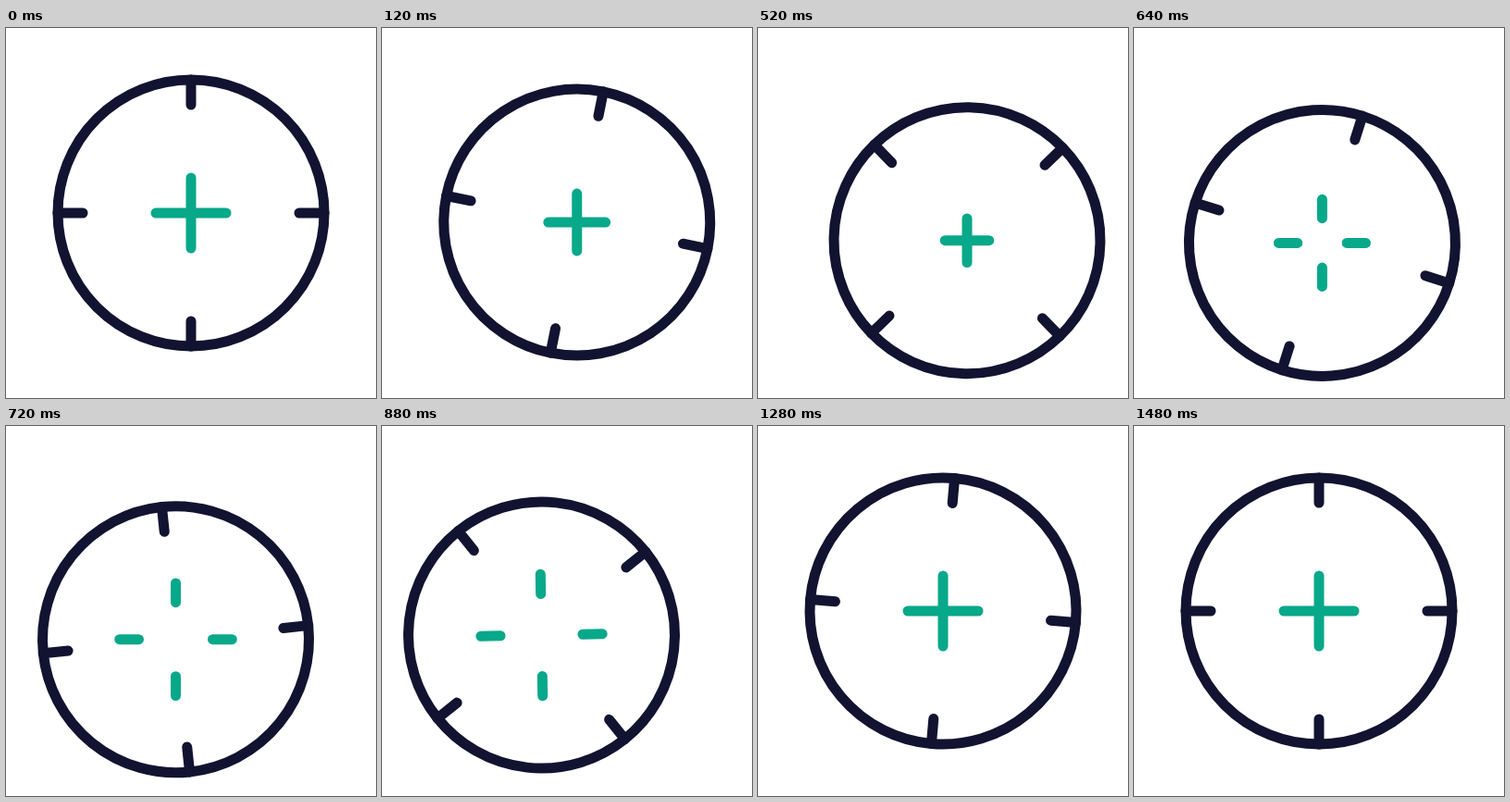
An HTML page that plays this animation: 400x400 px, repeating every 1570 ms.

```html
<!DOCTYPE html>
<html lang="en">
<head>
<meta charset="utf-8">
<title>Target</title>
<style>
html, body { margin: 0; width: 100%; height: 100%; overflow: hidden; background: #fff; }
svg { display: block; width: 100%; height: 100%; fill: none; stroke-width: 11; stroke-linecap: round; }
#ring { stroke: #121331; }
#cross { stroke: #08a88a; }
</style>
</head>
<body>
<svg viewBox="0 0 400 400">
  <g id="target">
    <g id="cross"><path id="arms"/></g>
    <g id="ring">
      <circle r="144"/>
      <path d="M0-144V-117M144 0H117M0 144V117M-144 0H-117"/>
    </g>
  </g>
</svg>
<script>
const LOOP = 1570, STEP = 40, LAST = 1480;

// Smooth track through [time, value] pairs, without overshoot
function track(...keys) {
  const slope = i => (keys[i + 1][1] - keys[i][1]) / (keys[i + 1][0] - keys[i][0]);
  const tangent = keys.map((_, i) => {
    if (i === 0 || i === keys.length - 1) return 0;
    const a = slope(i - 1), b = slope(i);
    return a * b > 0 ? 2 * a * b / (a + b) : 0;
  });
  return t => {
    const i = keys.findIndex(k => k[0] > t) - 1;
    if (i < 0) return keys[keys.length - 1][1];
    const [t0, v0] = keys[i], [t1, v1] = keys[i + 1];
    const d = t1 - t0, u = (t - t0) / d, w = 1 - u;
    return v0 * w * w * (1 + 2 * u) + v1 * u * u * (3 - 2 * u)
      + d * u * w * (tangent[i] * w - tangent[i + 1] * u);
  };
}

const x = track([0, 200], [280, 228], [380, 228.5], [520, 226], [560, 223.3],
  [720, 183.5], [880, 172.5], [1040, 188], [1120, 198.8], [1200, 200]);
const y = track([0, 200], [280, 227], [520, 229.7], [560, 230.6], [640, 232.4],
  [720, 230.7], [880, 226], [1040, 209.8], [1120, 201.5], [1200, 200]);
const spin = track([0, 0], [280, 36.3], [430, 48], [520, 45.9],
  [720, -6], [1040, -63.8], [1280, -85], [1480, -90]);
const turn = track([0, 0], [860, 0], [1040, -45], [1220, -90]);
const inner = track([0, 0], [400, 0], [520, 4], [720, 40], [860, 45], [1040, 22], [1220, 0]);
const outer = track([0, 38], [280, 20], [400, 20], [520, 23.8], [720, 60.8],
  [860, 66], [1040, 52.5], [1220, 38]);

const el = id => document.getElementById(id);
const target = el("target"), ring = el("ring"), cross = el("cross"), arms = el("arms");

function draw(t) {
  const a = inner(t), b = outer(t);
  target.setAttribute("transform", `translate(${x(t)} ${y(t)})`);
  ring.setAttribute("transform", `rotate(${spin(t)})`);
  cross.setAttribute("transform", `rotate(${turn(t)})`);
  arms.setAttribute("d", `M0 ${-a}V${-b}M${a} 0H${b}M0 ${a}V${b}M${-a} 0H${-b}`);
}

const start = performance.now();
function tick() {
  const t = (performance.now() - start) % LOOP;
  draw(Math.min(Math.floor(t / STEP) * STEP, LAST));
  requestAnimationFrame(tick);
}
tick();
</script>
</body>
</html>
```
